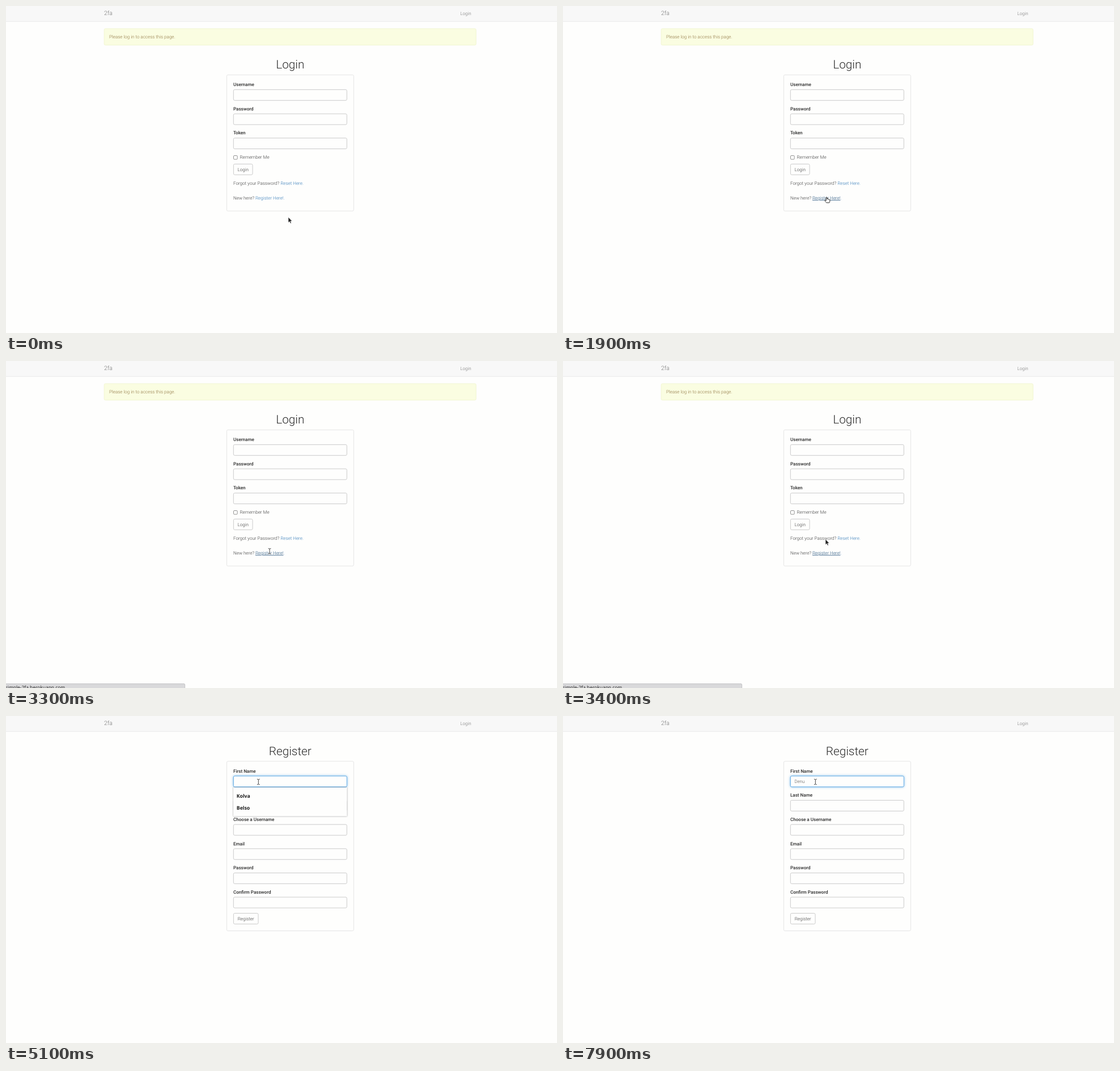
An HTML page for the animation above (8 s loop, 972 by 576 pixels).

```html
<!DOCTYPE html>
<html lang="en">
<head>
<meta charset="utf-8">
<title>Two-factor login demo</title>
<style>
  html, body { margin: 0; width: 100%; height: 100%; overflow: hidden; background: #fefefd; }
  svg { display: block; width: 972px; height: 576px; }
  text { font: 300 8.064px Roboto, sans-serif; fill: #3c3c3c; text-rendering: geometricPrecision; white-space: pre; }
  .nav { fill: #777; }
  .brand { font-size: 10.37px; }
  .title { font-size: 20.74px; fill: #2c2c2c; text-anchor: middle; }
  .label { font-weight: 500; fill: #2a2a2a; }
  .mid { text-anchor: middle; }
  .note { fill: #8f7340; }
  .typed { fill: #555; }
  .link { fill: #337ab7; }
  .link.hover { fill: #23527c; text-decoration: underline; }
  .box { fill: #fefefd; stroke: #c6c6c6; stroke-width: .9; }
  .panel { stroke: #e2e2e2; }
  .focus { fill: #fefefd; stroke: #66afe9; filter: drop-shadow(0 0 1.9px rgba(102, 175, 233, .8)); }
  .menu { fill: #fefefd; filter: drop-shadow(0 .6px .8px rgba(0, 0, 0, .45)); }
  .option { font: 700 8.7px "Noto Sans", sans-serif; fill: #1c1c1c; }
  .status { font: 400 8.4px "Noto Sans", sans-serif; fill: #222; }
</style>
</head>
<body>
<svg id="stage" viewBox="0 0 972 576" xmlns="http://www.w3.org/2000/svg"></svg>
<script>
const LOOP = 8000;
const STEP = 42.65; // distance between form fields

const text = (x, y, str, cls = '', id = '') =>
  `<text x="${x}" y="${y}" class="${cls}" id="${id}">${str}</text>`;
const box = (x, y, w, h, cls = '') =>
  `<rect x="${x}" y="${y}" width="${w}" height="${h}" rx="2.2" class="box ${cls}"/>`;
const button = (y, w, str) =>
  box(401.4, y, w, 18.9) + text(401.4 + w / 2, y + 12.4, str, 'mid');

// Heading, panel and labelled inputs shared by both pages
function form(title, top, height, labels) {
  const fields = labels.map((label, i) =>
    text(401, top + 19.8 + i * STEP, label, 'label') +
    box(401.3, top + 26 + i * STEP, 200, 19)).join('');
  return text(501.3, top - 11.2, title, 'title') +
    box(389.4, top, 224, height, 'panel') + fields;
}

const loginPage = `<g id="login">
  <rect x="173.2" y="39.9" width="656" height="29" rx="2.2" fill="#fafde1" stroke="#f1f5d0" stroke-width=".9"/>
  ${text(182, 57.2, 'Please log in to access this page.', 'note')}
  ${form('Login', 121.3, 239.8, ['Username', 'Password', 'Token'])}
  <rect x="401.5" y="263.5" width="6.6" height="6.6" rx="1.3" fill="#fefefd" stroke="#777" stroke-width=".8"/>
  ${text(412.5, 269.3, 'Remember Me')}
  ${button(278.4, 33.6, 'Login')}
  ${text(401, 314.7, 'Forgot your Password? <tspan class="link">Reset Here.</tspan>')}
  ${text(401, 340.7, 'New here? <tspan class="link" id="signup">Register Here!</tspan><tspan class="link">.</tspan>')}
</g>`;

const registerPage = `<g id="register">
  ${form('Register', 79.8, 298.6,
    ['First Name', 'Last Name', 'Choose a Username', 'Email', 'Password', 'Confirm Password'])}
  ${button(347.5, 43.6, 'Register')}
  <rect id="focus" class="focus" x="401.3" y="105.8" width="200" height="19" rx="2.2"/>
  ${text(408.2, 118.2, '', 'typed', 'typed')}
  <rect id="caret" y="110" width=".8" height="10" fill="#444"/>
  <g id="menu">
    <rect class="menu" x="401" y="126" width="200.6" height="50.6"/>
    ${text(406.8, 144.1, 'Kolva', 'option')}
    ${text(406.8, 164.8, 'Belso', 'option')}
  </g>
</g>`;

const statusBar = `<g id="status">
  <path id="bar" fill="#d9d9db" stroke="#b9b9bc" stroke-width=".8"/>
  ${text(-47, 577.8, '', 'status', 'statusText')}
</g>`;

const cursors = `
  <path id="arrow" d="M0 0V9.6L2.2 7.6L3.7 11L5.3 10.3L3.8 7H6.7Z" fill="#222" stroke="#fff" stroke-width=".5"/>
  <g id="beam" fill="none">
    <path d="M-2.4-4.8Q0-4.8 0-3.4Q0-4.8 2.4-4.8M0-3.6V3.6M-2.4 4.8Q0 4.8 0 3.4Q0 4.8 2.4 4.8" stroke="#fff" stroke-width="2"/>
    <path d="M-2.4-4.8Q0-4.8 0-3.4Q0-4.8 2.4-4.8M0-3.6V3.6M-2.4 4.8Q0 4.8 0 3.4Q0 4.8 2.4 4.8" stroke="#444" stroke-width="1"/>
  </g>
  <path id="hand" d="M-.9 .6Q0-.6 .9 .6V3.6Q2-.0 2.6 4Q3.6 3 4.2 4.4Q5.6 3.6 5.8 5.2V7.4L4.8 10H-.2L-3 6.6Q-3.6 5-2 5.3L-.9 6.4Z"
    fill="#fff" stroke="#222" stroke-width=".9" stroke-linejoin="round"/>`;

document.getElementById('stage').innerHTML = `
  <rect width="972" height="576" fill="#fefefd"/>
  <rect width="972" height="27" fill="#f8f8f8"/>
  <rect y="26.8" width="972" height=".8" fill="#e4e4e4"/>
  ${text(173, 16.3, '2fa', 'nav brand')}
  ${text(801.2, 15.6, 'Login', 'nav')}
  ${loginPage}${registerPage}${statusBar}${cursors}`;

// Each row: start time, then the value held until the next row
const pointer = [
  [0, 'arrow', 498, 372], [900, 'arrow', 493.6, 370.3],
  [1100, 'arrow', 488, 365], [1200, 'arrow', 476, 354], [1300, 'arrow', 466.8, 347.3],
  [1500, 'hand', 467, 342], [1600, 'hand', 466, 338], [1700, 'hand', 465, 335],
  [1800, 'hand', 465, 335.6], [1900, 'hand', 465, 336.6], [2000, 'hand', 465, 337.2],
  [2100, 'hand', 465, 338], [2600, 'hand', 466, 338.4],
  [3300, 'beam', 465, 335], [3400, 'arrow', 463, 314], [3500, 'arrow', 459, 262],
  [3600, 'arrow', 455, 216], [3700, 'beam', 451, 200], [3800, 'arrow', 448, 172],
  [3900, 'beam', 446.5, 157], [4000, 'arrow', 445.2, 140], [4100, 'arrow', 444.5, 127],
  [4200, 'beam', 446, 119], [4300, 'beam', 445.3, 116]
];
const typing = [
  [0, ''], [5200, 'D'], [6100, 'De'], [6600, 'Denu'], [6800, 'Denum'],
  [7000, 'Denuma'], [7800, 'Denum'], [7900, 'Denu']
];
const caretOn = [[0, 0], [4500, 1], [5100, 0], [5200, 1], [5800, 0], [6100, 1], [7600, 0]];
const focusOn = [[0, 0], [4500, .55], [4600, 1]];
const menuOn = [[0, 0], [4600, 1], [5300, .4], [5400, 0]];
const status = [
  [0, 0, ''], [2000, 131, 'https://simple-2fa.herokuapp.com/register'],
  [3000, 316, 'Waiting for simple-2fa.herokuapp.com'], [3500, 0, '']
];

const el = id => document.getElementById(id);
const at = (table, t) => table.findLast(row => row[0] <= t).slice(1);
const show = (id, on) => { el(id).style.display = on ? '' : 'none'; };

function draw(t) {
  show('login', t < 3500);
  show('register', t >= 3500);
  el('signup').classList.toggle('hover', t >= 1500);

  const [kind, x, y] = at(pointer, t);
  for (const id of ['arrow', 'beam', 'hand']) show(id, id === kind);
  el(kind).setAttribute('transform', `translate(${x} ${y})`);

  const [width, message] = at(status, t);
  show('status', width);
  el('bar').setAttribute('d', `M-2 568.6H${width - 2}Q${width - .4} 568.6 ${width - .4} 570.4V580H-2Z`);
  el('statusText').textContent = message;

  const typed = el('typed');
  typed.textContent = at(typing, t)[0];
  const typedWidth = typed.textContent ? typed.getComputedTextLength() : 0;
  el('caret').setAttribute('x', 408.2 + typedWidth);
  show('caret', at(caretOn, t)[0]);
  el('focus').style.opacity = at(focusOn, t)[0];
  el('menu').style.opacity = at(menuOn, t)[0];
}

const start = performance.now();
function tick() {
  draw((performance.now() - start) % LOOP);
  requestAnimationFrame(tick);
}
tick();
</script>
</body>
</html>
```
